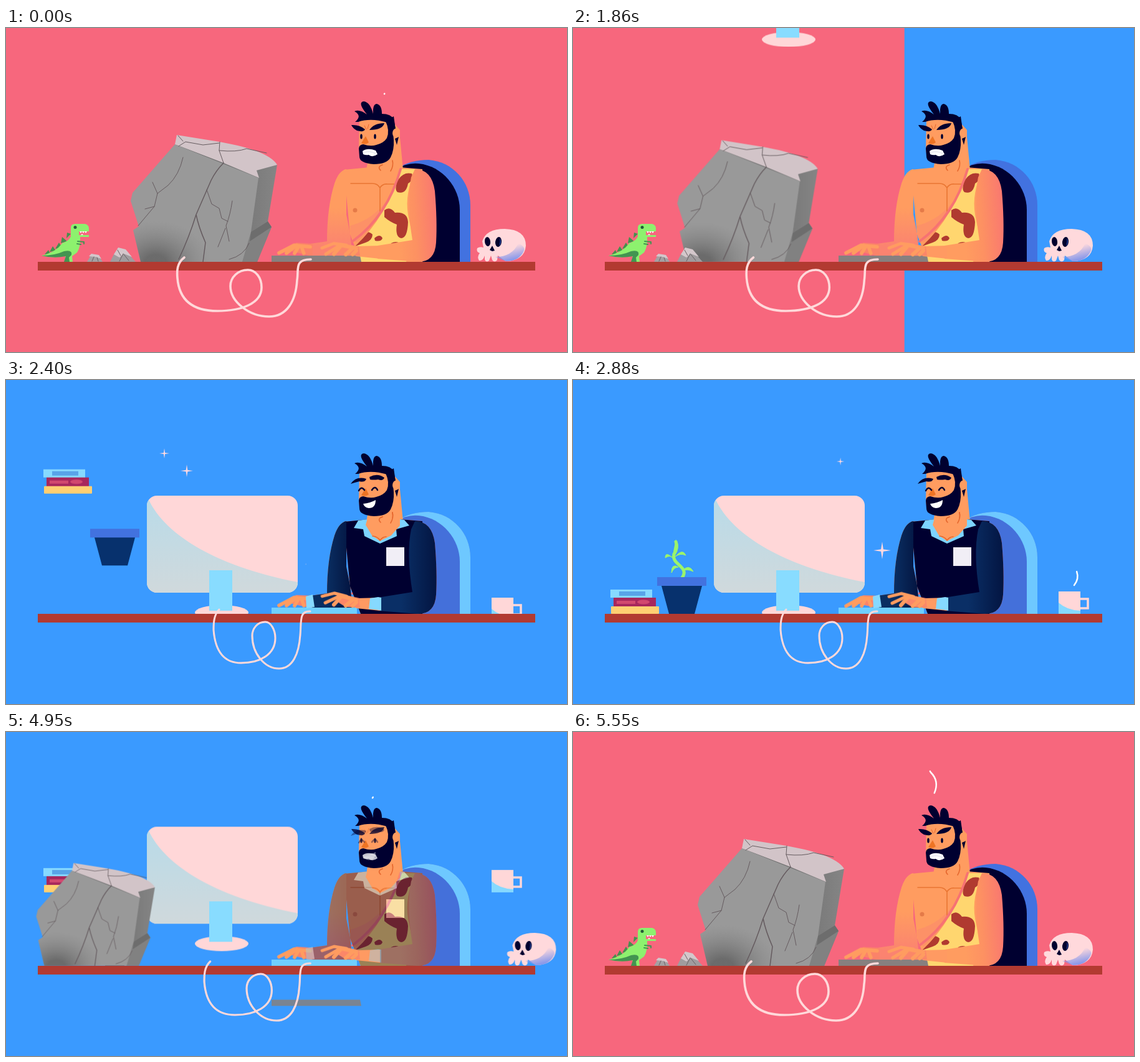
Write an HTML page that moves like this. It is 900x521 px and loops after 5.58 s.

```html
<!DOCTYPE html>
<html lang="en">
<head>
<meta charset="utf-8">
<title>From stone age to desk job</title>
<style>
html, body { margin: 0; width: 100%; height: 100%; overflow: hidden; background: #f7677d; }
svg { display: block; width: 100vw; height: 100vh; }
.a { animation: 5580ms linear infinite; }
.ln { fill: none; stroke-linecap: round; stroke-linejoin: round; }

/* One loop is 5580 ms, so 1% is 55.8 ms. */
.wipe { animation-name: wipe; }
@keyframes wipe {
  0%, 31.8% { transform: translateX(900px); animation-timing-function: cubic-bezier(.215,.61,.355,1); }
  41.85% { transform: none; }
  88.8% { transform: none; animation-timing-function: ease-in-out; }
  92.1%, 100% { transform: translateX(900px); }
}
.rock { animation-name: rock; transform-origin: -600px 376px; }
@keyframes rock {
  0%, 31.05% { transform: scale(1); animation-timing-function: ease-in; }
  40.4% { transform: scale(.55); }
  85.4% { transform: scale(.55); animation-timing-function: cubic-bezier(.215,.61,.355,1); }
  99.4%, 100% { transform: scale(1); }
}
.left { animation-name: left; }
@keyframes left {
  0%, 33.6% { transform: none; animation-timing-function: ease-in; }
  38.5%, 90.3% { transform: translateX(-240px); animation-timing-function: cubic-bezier(.215,.61,.355,1); }
  98%, 100% { transform: none; }
}
.right { animation-name: right; }
@keyframes right {
  0%, 33.6% { transform: none; animation-timing-function: ease-in; }
  38.5%, 85.35% { transform: translateX(160px); animation-timing-function: cubic-bezier(.215,.61,.355,1); }
  96.1%, 100% { transform: none; }
}
.mac { animation-name: mac; }
@keyframes mac {
  0%, 32.05% { transform: translateY(-410px); animation-timing-function: ease; }
  42.65% { transform: none; }
  86.65% { transform: none; animation-timing-function: ease-in; }
  95.7%, 100% { transform: translateY(-420px); }
}
.books { animation-name: books; }
@keyframes books {
  0%, 40.9% { transform: translateY(-400px); }
  43.01% { transform: translateY(-195px); }
  45.3% { transform: translateY(10px); animation-timing-function: ease-in-out; }
  47.3% { transform: none; }
  85.4% { transform: none; animation-timing-function: ease-in; }
  88.71% { transform: translateY(-117px); }
  93%, 100% { transform: translateY(-400px); }
}
.mug { animation-name: mug; }
@keyframes mug {
  0%, 38% { transform: translateY(-400px); }
  42.1% { transform: none; animation-timing-function: ease-out; }
  43.01% { transform: translateY(10px); animation-timing-function: ease-in-out; }
  44.8% { transform: none; }
  85.4% { transform: none; animation-timing-function: ease-in; }
  88.71% { transform: translateY(-117px); }
  93%, 100% { transform: translateY(-400px); }
}
.pot { animation-name: pot; transform-origin: 174px 376px; }
@keyframes pot {
  0%, 39.1% { transform: translateY(-400px); }
  43.01% { transform: translateY(-79px); }
  44.3% { transform: translateY(10px); animation-timing-function: ease-in-out; }
  46.2%, 86.6% { transform: none; animation-timing-function: ease-in; }
  88.71% { transform: scale(.75); }
  91.4%, 100% { transform: scale(0); }
}
.plant { animation-name: plant; transform-origin: 174px 318px; }
@keyframes plant {
  0%, 45% { transform: scale(0); animation-timing-function: ease-out; }
  51%, 100% { transform: none; }
}
.slab { animation-name: slab; }
@keyframes slab {
  0%, 34% { transform: none; opacity: 1; animation-timing-function: ease-in; }
  37.6%, 86.9% { transform: translateY(110px); opacity: 0; }
  88.71% { transform: translateY(65px); opacity: .85; animation-timing-function: ease-out; }
  92.3%, 100% { transform: none; opacity: 1; }
}
.modern { animation-name: modern; }
@keyframes modern {
  0%, 36.7% { opacity: 0; }
  40.3%, 87.4% { opacity: 1; }
  88.71% { opacity: .4; }
  90%, 100% { opacity: 0; }
}
.ancient { animation-name: ancient; }
@keyframes ancient {
  0%, 36.7% { opacity: 1; }
  40.3%, 87.4% { opacity: 0; }
  88.71% { opacity: .75; }
  90%, 100% { opacity: 1; }
}
.late { animation-name: late; }
@keyframes late {
  0%, 33.4% { opacity: 0; }
  38.5%, 88.9% { opacity: 1; }
  91.4%, 100% { opacity: 0; }
}
.cable { animation-name: cable; }
@keyframes cable {
  0%, 31.6% { d: path("M286,369C274,378 274,391 275,402C278,440 302,455 339,455C378,455 410,443 410,417C410,402 401,389 388,389C372,389 360,401 360,415C360,440 390,464 422,464C450,464 465,440 467,405C470,388 462,372 489,372"); stroke-width: 3.6px; animation-timing-function: ease-in; }
  40.5%, 87.1% { d: path("M342,369C333,378 333,392 333,402C336,440 352,455 377,455C408,455 432,441 432,415C432,402 425,389 416,389C403,389 395,400 395,411C395,440 415,464 438,464C460,464 470,440 472,410C474,388 470,371 488,372"); stroke-width: 3px; animation-timing-function: ease; }
  96%, 100% { d: path("M286,369C274,378 274,391 275,402C278,440 302,455 339,455C378,455 410,443 410,417C410,402 401,389 388,389C372,389 360,401 360,415C360,440 390,464 422,464C450,464 465,440 467,405C470,388 462,372 489,372"); stroke-width: 3.6px; }
}

/* Steam strokes travel along their paths; gates show them only in their scene. */
.steam { fill: none; stroke: #fff; stroke-width: 2.5; stroke-linecap: round; stroke-dasharray: 60 300; animation: puff 930ms linear infinite; }
@keyframes puff {
  0% { stroke-dashoffset: 59.5; visibility: visible; }
  64.5% { stroke-dashoffset: -101; visibility: hidden; }
  100% { stroke-dashoffset: -101; visibility: hidden; }
}
.fume1 { animation-name: fume1; }
@keyframes fume1 { 0%, 32.8% { opacity: 1; } 32.81%, 100% { opacity: 0; } }
.fume2 { animation-name: fume2; }
@keyframes fume2 { 0%, 32.8% { opacity: 1; } 32.81%, 88% { opacity: 0; } 88.01%, 100% { opacity: 1; } }
.fume3 { animation-name: fume3; }
@keyframes fume3 { 0%, 8% { opacity: 0; } 8.01%, 27% { opacity: 1; } 27.01%, 92% { opacity: 0; } 92.01%, 100% { opacity: 1; } }
.hot { animation-name: hot; }
@keyframes hot { 0%, 47% { opacity: 0; } 47.01%, 82.5% { opacity: 1; } 82.51%, 100% { opacity: 0; } }
.shine { animation-name: shine; }
@keyframes shine { 0%, 40.5% { opacity: 0; } 40.51%, 83% { opacity: 1; } 83.01%, 100% { opacity: 0; } }
.star { animation: twinkle 797.143ms linear infinite; }
@keyframes twinkle { 0% { transform: scale(0); } 26% { transform: scale(var(--r)); } 52%, 100% { transform: scale(0); } }

.type { animation: type 186ms ease-in-out infinite alternate; }
.type.l { animation-delay: -120ms; transform-origin: 490px 357px; }
.type.r { transform-origin: 575px 360px; }
@keyframes type { from { transform: rotate(-.6deg); } to { transform: rotate(2deg); } }
.tap { animation: tap 310ms ease-in-out infinite; transform-origin: 548px 350px; }
@keyframes tap { 0%, 100% { transform: none; } 50% { transform: rotate(8deg); } }
</style>
</head>
<body>
<svg viewBox="0 0 900 521" preserveAspectRatio="none">
<defs>
  <linearGradient id="side" x1="0" x2="1"><stop stop-color="#5c5c5c"/><stop offset="1" stop-color="#858585"/></linearGradient>
  <radialGradient id="dust" gradientUnits="userSpaceOnUse" cx="0" cy="0" r="1" gradientTransform="translate(240 378) scale(88 68)"><stop offset=".2" stop-color="#606060" stop-opacity=".8"/><stop offset="1" stop-color="#808080" stop-opacity="0"/></radialGradient>
  <linearGradient id="armL" x1="0" y1="0" x2="0" y2="1"><stop offset=".45" stop-color="#ff9c60"/><stop offset=".9" stop-color="#fb8370"/></linearGradient>
  <linearGradient id="armR" x1="0" x2="1" y1=".3" y2=".2"><stop offset=".3" stop-color="#ff9c60"/><stop offset=".6" stop-color="#fd9162"/><stop offset="1" stop-color="#f97671"/></linearGradient>
  <linearGradient id="sleeveL" x1="0" x2="1"><stop offset=".4" stop-color="#0a2e61"/><stop offset="1" stop-color="#03133f"/></linearGradient>
  <linearGradient id="sleeveR" x1="0" x2="1"><stop offset=".4" stop-color="#0a2f66"/><stop offset="1" stop-color="#031542"/></linearGradient>
  <linearGradient id="jaw" x1="0" y1="0" x2=".4" y2="1"><stop offset=".3" stop-color="#8797ea" stop-opacity="0"/><stop offset="1" stop-color="#8797ea"/></linearGradient>
  <linearGradient id="glass" x1="0" y1="0" x2="0" y2="1"><stop stop-color="#b8dbe9"/><stop offset="1" stop-color="#d0d9dc"/></linearGradient>
  <clipPath id="screen"><rect x="226" y="186" width="242" height="156" rx="16"/></clipPath>
  <clipPath id="tunicClip"><use href="#tunic"/></clipPath>
  <path id="torso" d="M542,228L583,224H632L668,227V376H569L552,332Z"/>
  <path id="tunic" d="M633,227H658Q639,265 645,300L653,340L642,376H569L560,351Q612,302 633,227Z"/>
  <path id="upperL" d="M546,227Q534,229 527,250Q515,288 515,343L488,347L491,366H556L552,330L546,300Z"/>
  <path id="upperR" d="M656,227Q683,227 688,262Q692,310 690,345Q688,377 660,376L596,371V350L652,341Q642,280 650,240Z"/>
  <path id="backOut" d="M628,226Q648,212 678,212C717,215 745,247 745,285V376H640Z"/>
  <path id="backIn" d="M626,228Q642,216 662,218C701,222 728,257 728,292V376H640Z"/>
  <path id="face" d="M271,187L405,241L393,328L379,376H216L204,325L213,319L200,278L203,265Z"/>
  <path id="spark" d="M0,-15L2,-2L15,0L2,2L0,15L-2,2L-15,0L-2,-2Z"/>
</defs>

<rect width="900" height="521" fill="#f7677d"/>
<rect class="a wipe" width="901" height="521" fill="#3a9aff"/>

<g fill="#4272e0"><use href="#backOut"/><use href="#backIn" fill="#000030"/></g>
<g class="a late" fill="#6ec8ff"><use href="#backOut"/><use href="#backIn" fill="#4470da"/></g>

<g class="a books">
  <rect x="60" y="337" width="67" height="13" fill="#86d9ff"/><rect x="74" y="340" width="42" height="7" fill="#58a4e8"/>
  <rect x="65" y="350" width="68" height="14" fill="#a7275d"/><rect x="70" y="355" width="30" height="5" fill="#d2486f"/><ellipse cx="113" cy="357" rx="10" ry="3.5" fill="#d2486f"/>
  <rect x="61" y="364" width="77" height="12" rx="1" fill="#ffcf72"/>
</g>
<g class="a pot">
  <g class="a plant" fill="#9bf46b">
    <path class="ln" d="M175,318C188,300 157,297 162,280Q169,270 165,260" stroke="#9bf46b" stroke-width="5"/>
    <path d="M161,276L165,256Q170,270 165,280Z"/>
    <path d="M162,288Q148,274 148,286Q156,280 162,288ZM164,284Q176,270 181,282Q172,278 164,284ZM169,301Q158,294 158,310Q162,301 169,301ZM175,307Q186,295 193,308Q183,303 175,307Z" stroke="#9bf46b"/>
  </g>
  <path d="M142,331H207L195,376H154Z" fill="#07316d"/><rect x="135" y="317" width="79" height="14" fill="#4272df"/>
</g>
<g class="a mug">
  <rect x="812" y="352" width="14" height="15" fill="none" stroke="#ffd7d8" stroke-width="3.5"/>
  <rect x="779" y="340" width="35" height="36" fill="#ffd7d8"/><path d="M779,358Q792,370 814,371V376H779Z" fill="#86d9ff"/>
</g>
<g class="a hot">
  <path class="steam" pathLength="100" d="M804,330C812,320 811,306 801,298L796,293" style="animation-delay:-110ms"/>
  <path class="steam" pathLength="100" d="M788,330C796,320 794,306 786,298" style="animation-delay:-750ms"/>
</g>

<g class="a mac">
  <ellipse cx="346" cy="374" rx="43" ry="12" fill="#ffd7d8"/>
  <g clip-path="url(#screen)"><rect x="226" y="186" width="242" height="156" fill="#ffd7d8"/><path d="M226,186C250,245 330,298 468,325V342H226Z" fill="url(#glass)"/></g>
  <rect x="326" y="306" width="37" height="65" fill="#88dcff"/>
</g>

<g class="a left">
  <path d="M62,364l6,-7 3,6zM70,360l5,-9 5,7zM79,355l6,-10 5,8zM88,346l2,-10 8,7zM97,338l1,-9 6,2z" fill="#45904d"/>
  <path d="M57,366Q81,360 90,346Q102,342 104,335V321Q104,315 111,315H127Q134,316 133,327H117V333H133V336H119Q120,352 114,361L106,367L107,376H97L95,366Q77,371 57,366Z" fill="#8df16e"/>
  <path d="M57,366Q78,366 93,359Q107,356 105,365L101,369L102,376H93L96,367Q77,371 57,366Z" fill="#439451"/>
  <path d="M115,343l10,1v3M114,347l6,1" class="ln" stroke="#439451" stroke-width="2"/>
  <circle cx="111" cy="320.5" r="2.5" fill="#245b38"/>
  <path d="M118,327l2,3 2,-3 2,3 2,-3 2,3 2,-3zM120,333l2,-2 2,2z" fill="#fff"/>
</g>
<g class="a right">
  <path d="M764,343Q770,323 800,323Q834,324 834,350Q832,374 802,375L789,366L788,373Q784,378 780,373L778,366L775,374Q770,378 768,372V366Q765,375 759,374Q755,368 760,362Q754,360 756,354Q760,351 766,353Z" fill="#ffd9dc"/>
  <path d="M785,368Q812,368 822,346Q834,352 831,358Q824,375 802,375Z" fill="url(#jaw)"/>
  <g fill="#00002e"><ellipse cx="772.5" cy="343.5" rx="4.5" ry="7.5" transform="rotate(-8 773 343)"/><ellipse cx="790" cy="344" rx="5" ry="8" transform="rotate(8 790 344)"/><path d="M780,350l4,8 -4,1 -4,-2z"/></g>
  <path d="M792,338Q796,344 791,351Q794,344 792,338Z" fill="#4272e0"/>
</g>

<g class="a rock">
  <path d="M271,187L402,225L435,220L420,311L426,320L403,376H375L390,320Z" fill="url(#side)"/>
  <path d="M393,328L420,311L426,320L403,376H379Z" fill="#818181"/>
  <path d="M393,328L420,311L426,320L391,343Z" fill="#6d6d6d"/>
  <use href="#face" fill="#999"/><use href="#face" fill="url(#dust)"/>
  <path d="M271,187L274,172L330,181Q420,195 435,220L402,229L406,241L349,217Z" fill="#d2c4c8"/>
  <g class="ln" stroke="#655b5f">
    <path d="M349,217Q337,229 329,245L305,300Q294,336 277,372M305,300Q309,320 320,345L316,376" stroke-width="1.5"/>
    <path d="M284,208Q278,236 260,253L243,266L238,287L212,318M235,248L243,266M238,287L223,291M322,260L330,283L342,290L346,306L356,311M363,278Q360,300 353,318L358,343M340,352L352,322M390,346Q382,366 358,372M343,183L342,197L349,217M342,197Q370,200 386,194L418,201M277,190L288,183L316,188L342,185M276,173L284,182"/>
  </g>
</g>
<g class="a left">
  <path d="M130,376L137,364L148,365L155,376Z" fill="#a5a0a2"/><path d="M133,367L137,363L149,365L153,371L143,368Z" fill="#d4c7cb"/>
  <path d="M167,376L173,364L180,354L190,356L208,376Z" fill="#a09c9e"/><path d="M173,364L180,353L192,356L202,368L189,363L182,369Z" fill="#d4c7cb"/>
  <path class="ln" d="M141,368l-3,7M146,369l2,6M188,363l-6,12M189,364l8,10M179,357l5,9" stroke="#6a6064"/>
</g>

<!-- body -->
<path d="M583,200L578,228L600,262L637,228L631,165Z" fill="#ff9c60"/>
<use href="#torso" fill="#ff9c60"/>
<path d="M552,318Q600,306 628,250L633,228Q615,300 562,345L553,337Z" fill="#f97f70" opacity=".4"/>
<path class="ln" d="M553,250H588Q596,250 600,257Q604,250 612,251H626M600,257V298" stroke="#e97532" stroke-width="1.6"/>
<circle cx="560" cy="293" r="3.5" fill="#e57a48"/>
<use href="#tunic" fill="#ffd66f"/>
<path class="ln" d="M633,227Q612,302 556,343" stroke="#f77273" stroke-width="4"/>
<g clip-path="url(#tunicClip)" fill="#b03a30">
  <path d="M630,243Q638,231 651,234Q655,244 645,250Q642,268 628,264Q622,259 630,243ZM607,293Q616,286 624,297Q644,295 645,312Q644,338 634,338Q624,336 627,316Q616,312 607,304ZM568,332Q580,324 588,332Q588,341 577,345L560,351ZM591,338Q600,330 604,338Q602,344 592,342ZM618,346Q630,340 636,352H616Z"/>
</g>
<use href="#upperL" fill="url(#armL)"/>

<!-- head -->
<path d="M567,148L566,196Q568,217 592,218Q620,217 624,195L632,178V164L612,142Z" fill="#ff9c60"/>
<path class="ln" d="M604,220q-9,3 -3,9M620,213q2,9 -3,17" stroke="#e5672e" stroke-width="1.6"/>
<g fill="#000030">
  <path d="M566,194Q566,188 573,187Q585,191 594,188Q606,185 611,177Q616,165 609,150L622,142L625,163L621,168L622,180Q623,196 617,208Q611,219 590,219Q567,217 567,207Z"/>
  <path d="M560,151Q572,141 559,134Q567,130 579,139Q563,119 574,118Q584,119 589,138Q588,122 595,122Q603,124 603,138Q618,138 622,147L625,163L616,160Q611,150 606,150L612,152Q585,144 565,151Z"/>
  <path d="M624,178L630,175L627,188Z"/>
</g>
<ellipse cx="626" cy="169" rx="6" ry="7.5" fill="#ff9c60"/>
<path d="M577,174L570,185Q576,189 582,184Z" fill="#ee7424"/>
<g class="a ancient" fill="#000030">
  <path d="M554,156Q567,155 576,163Q574,168 563,165Q556,161 554,156ZM583,164Q590,153 607,153Q604,164 583,164Z"/>
  <ellipse cx="570" cy="174.5" rx="1.8" ry="4"/><ellipse cx="592" cy="174.5" rx="1.8" ry="4"/>
  <path class="ln" d="M575,157l3,6M582,155l-2,7" stroke="#e5672e"/>
  <path d="M572,198Q580,192 593,197L596,203Q588,209 582,204Q577,205 573,203Z" fill="#fff"/>
  <path class="ln" d="M575,200q9,-3 18,2" stroke="#cfcfe0" stroke-width=".7"/>
</g>
<g class="a modern" fill="#000030">
  <path d="M553,167Q562,154 578,159Q576,165 567,163Q559,165 553,167ZM583,156Q596,149 607,157Q605,163 597,160Q589,161 584,160Z"/>
  <path class="ln" d="M566,178q4,-8 9,-1M587,177q5,-8 9,0" stroke="#000030" stroke-width="2.4"/>
  <path d="M573,199Q584,198 593,193Q593,206 582,206Q575,205 573,199Z" fill="#fff"/>
</g>

<rect x="51" y="376" width="798" height="14" fill="#b23a31"/>
<path class="a slab" d="M426,366H568L570,376H426Z" fill="#87807f"/>
<rect class="a late" x="426" y="366" width="137" height="10" fill="#6fcfff"/>

<!-- arms and hands -->
<g class="type l">
  <path d="M492,347L466,346Q452,350 450,358L486,366H492Z" fill="#fb8369"/>
  <path class="ln" d="M488,352L462,350L438,363M466,350L450,363M470,351L463,363M474,352L478,363" stroke="#ff9c60" stroke-width="5.5"/>
</g>
<use href="#upperR" fill="url(#armR)"/>

<g class="a modern">
  <use href="#torso" fill="#000030"/>
  <use href="#upperL" fill="url(#sleeveL)"/>
  <use href="#upperR" fill="url(#sleeveR)"/>
  <path d="M481,348L492,345L495,365L482,367Z" fill="#86d9ff"/>
  <path d="M565,226L558,238L573,240L575,251L600,263L627,251L626,240L647,234L639,225L632,224H580Z" fill="#7dd4ff"/>
  <path d="M580,222L577,233L587,250L600,259L618,250L632,234V222Z" fill="#ff9c60"/>
  <path class="ln" d="M604,220q-9,3 -3,9M620,213q2,9 -3,17M588,251q9,1 12,7q4,-6 10,-6" stroke="#e5672e" stroke-width="1.6"/>
  <rect x="610" y="269" width="29" height="30" fill="#f1eef6"/>
</g>

<path d="M600,350L562,351L546,358L562,367L600,371Z" fill="#ff9a62"/>
<g class="type r">
  <path d="M566,351L540,346L528,356L545,366H568Z" fill="#fb8768"/>
  <path class="ln" d="M562,354L538,349L526,363M556,354L545,364M562,358L556,364" stroke="#ff9c60" stroke-width="6"/>
  <path class="ln tap" d="M546,349L526,346L507,353M536,349L513,363" stroke="#ff9c60" stroke-width="5"/>
</g>
<path class="a modern" d="M584,351L597,349L602,350V371L599,370L582,368Z" fill="#86d9ff"/>

<path class="a cable ln" stroke="#ffd9da" stroke-width="3.5" d="M286,369"/>

<g class="a fume1"><path class="steam" pathLength="100" d="M607,106C618,88 614,74 604,62Q600,55 602,48"/></g>
<g class="a fume2"><path class="steam" pathLength="100" d="M588,106C600,88 596,76 587,64Q583,56 586,48" style="animation-delay:-635ms"/></g>
<g class="a fume3"><path class="steam" pathLength="100" d="M575,107C586,90 585,76 574,65Q569,58 571,48" style="animation-delay:-310ms"/></g>

<g class="a shine" fill="#ffd9e0" id="stars"></g>
</svg>
<script>
// x, y, peak scale, delay in ms
const stars = [
  [254, 118, 1, -101], [290, 146, .8, -163],
  [429, 131, .68, -432], [496, 274, 1, -501], [481, 296, .4, -36]
];
document.getElementById('stars').innerHTML = stars.map(([x, y, r, delay]) =>
  `<g transform="translate(${x} ${y})"><use href="#spark" class="star" style="--r:${r};animation-delay:${delay}ms"/></g>`
).join('');
</script>
</body>
</html>
```
